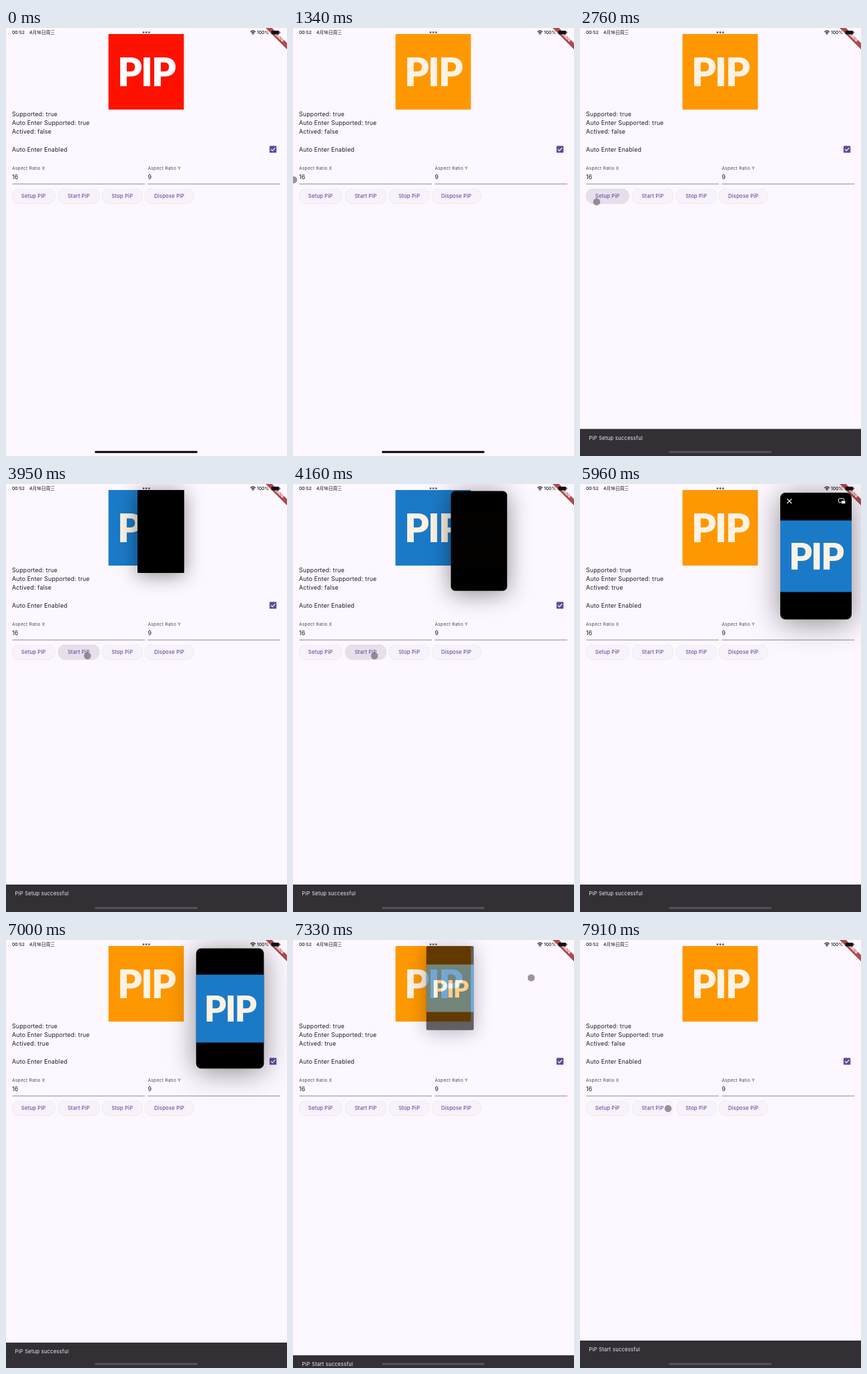
An HTML page for the animation above (8 s loop, 421 px wide and 640 px high).

```html
<!DOCTYPE html>
<html>
<head>
<meta charset="utf-8">
<style>
  html, body { margin: 0; width: 100%; height: 100%; overflow: hidden; background: #fdf8ff; }
  svg { display: block; width: 421px; height: 640px; font-family: Inter, "Noto Sans CJK SC", sans-serif; fill: #1d1b20; }
  .body { font-size: 8.8px; letter-spacing: .2px; }
  .label { font-size: 6.6px; letter-spacing: .28px; fill: #49454f; }
  .button { font-size: 7.7px; letter-spacing: .17px; font-weight: 500; fill: #6750a4; text-anchor: middle; }
  .status { font-size: 6.7px; font-weight: 500; }
  .pill { filter: drop-shadow(0 .7px .6px rgba(60, 40, 80, .3)); }
  .logo { font: 900 58px Lato, sans-serif; letter-spacing: -2px; text-anchor: middle; }
  #pip { filter: drop-shadow(0 5px 22px rgba(0, 0, 0, .45)); }
</style>
</head>
<body>
<svg viewBox="0 0 421 640">
  <rect width="421" height="640" fill="#fdf8ff"/>

  <g transform="translate(153.5 9)">
    <rect id="appColor" width="113" height="113"/>
    <text id="appLogo" class="logo" x="56.5" y="78">PIP</text>
  </g>

  <g class="body">
    <text x="9" y="131.7">Supported: true</text>
    <text x="9" y="144.8">Auto Enter Supported: true</text>
    <text id="active" x="9" y="157.8"></text>
    <text x="9" y="185">Auto Enter Enabled</text>
    <text x="9" y="225.6">16</text>
    <text x="212.5" y="225.6">9</text>
  </g>
  <rect x="394.8" y="176.2" width="10.4" height="10.4" rx="1.2" fill="#5f499f"/>
  <path d="M396.9 181.4l2.2 2.3 4.2-4.5" fill="none" stroke="#fff" stroke-width="1.2"/>
  <text class="label" x="9" y="212">Aspect Ratio X</text>
  <text class="label" x="212.5" y="212">Aspect Ratio Y</text>
  <path d="M9.5 233.2H208M212.5 233.2H411" stroke="#6f6a73" stroke-width=".8"/>
  <g id="buttons"></g>

  <g id="snack">
    <rect y="599" width="421" height="42" fill="#322f35"/>
    <text id="snackText" x="13.5" y="615" font-size="7.6" letter-spacing=".25" fill="#f5eff7"></text>
  </g>

  <path d="M389 0h9.6L421 22.4V32Z" fill="#b04a4e"/>
  <text transform="translate(408.4 12.6) rotate(45)" text-anchor="middle" y="2" font-size="5.6" font-weight="900" fill="#fff">DEBUG</text>

  <g class="status">
    <text x="9" y="9">00:52</text>
    <text x="35" y="9">4月16日周三</text>
    <text x="376" y="9">100%</text>
  </g>
  <g fill="#55525a">
    <circle cx="206" cy="6.6" r="1.4"/><circle cx="210.2" cy="6.6" r="1.4"/><circle cx="214.4" cy="6.6" r="1.4"/>
  </g>
  <g fill="none" stroke="#111" stroke-width="1.2">
    <path d="M366.3 5.7q3.7-3.2 7.4 0M367.7 7.4q2.3-1.9 4.6 0"/>
  </g>
  <circle cx="370" cy="8.8" r="1"/>
  <rect x="397.5" y="4" width="12" height="5.4" rx="1.5" fill="#111"/>
  <rect x="410.1" y="5.7" width=".8" height="2" fill="#111"/>

  <g id="pip">
    <rect id="pipFrame" width="107" height="189.5" fill="#000"/>
    <g id="pipVideo" transform="translate(0 41.5) scale(.947)">
      <rect id="pipColor" width="113" height="113"/>
      <text id="pipLogo" class="logo" x="56.5" y="78">PIP</text>
    </g>
    <g id="controls" fill="none" stroke="#fff">
      <path d="M10.2 9.2l7 7M17.2 9.2l-7 7" stroke-width="1.2"/>
      <rect x="87.5" y="8.7" width="8" height="6" rx="1"/>
      <rect x="91.5" y="12" width="6.2" height="4.6" rx="1" fill="#fff" stroke="#000" stroke-width=".6"/>
    </g>
  </g>

  <rect id="home" x="133" y="632.6" width="154" height="3" rx="1.5"/>
  <circle id="pointer" r="5.3" fill="#6b6470" opacity=".68"/>
</svg>
<script>
const LOOP = 8000;
const RED = '#ff1100', ORANGE = '#ff9800', BLUE = '#1b7ac8';
const $ = id => document.getElementById(id);
const set = (id, attrs) => { for (const k in attrs) $(id).setAttribute(k, attrs[k]); };
const show = (id, on) => set(id, { visibility: on ? 'visible' : 'hidden' });
const ramp = (t, from, to) => {
  const p = Math.min(1, Math.max(0, (t - from) / (to - from)));
  return p * p * (3 - 2 * p);
};
const mix = (a, b, p) => a + (b - a) * p;
const within = (t, from, to) => t >= from && t < to;

const buttons = [
  ['Setup PiP', 9, 64.5, 2400, 2960],
  ['Start PiP', 78, 62, 3620, 4200],
  ['Stop PiP', 144, 60.5],
  ['Dispose PiP', 208, 73.5]
];
$('buttons').innerHTML = buttons.map(([name, x, w], i) =>
  `<rect id="b${i}" class="pill" x="${x}" y="240" width="${w}" height="22.8" rx="11.4"/>
   <text class="button" x="${x + w / 2}" y="254.3">${name}</text>`).join('');

// time, x, y
const route = [
  [1250, -8, 222], [1340, 1, 227], [2050, 25, 260], [2900, 25, 260],
  [3520, 122, 257], [4400, 122, 257], [4810, 235, 119], [5350, 392, 26],
  [7250, 392, 26], [7850, 132, 252]
];
function pointerAt(t) {
  const i = route.findIndex(k => k[0] > t);
  if (i === 0) return [-20, 222];
  if (i < 0) return route[route.length - 1].slice(1);
  const [t0, x0, y0] = route[i - 1], [t1, x1, y1] = route[i];
  const p = (t - t0) / (t1 - t0);
  return [mix(x0, x1, p), mix(y0, y1, p)];
}

function paint(name, color) {
  set(name + 'Color', { fill: color });
  set(name + 'Logo', { fill: color === RED ? '#fff' : '#fdf3e4' });
}

function draw(t) {
  paint('app', t < 800 ? RED : within(t, 3300, 5700) ? BLUE : ORANGE);
  paint('pip', t < 5700 ? ORANGE : BLUE);
  $('active').textContent = 'Actived: ' + within(t, 4450, 7350);
  buttons.forEach(([, , , from, to], i) =>
    set('b' + i, { fill: within(t, from, to) ? '#e7e0eb' : '#f8f2fb' }));

  const lift = t < 7210
    ? ramp(t, 2490, 2780) - ramp(t, 6960, 7210)
    : ramp(t, 7210, 7460);
  set('snack', { transform: `translate(0 ${42 * (1 - lift)})` });
  $('snackText').textContent = t < 7210 ? 'PiP Setup successful' : 'PiP Start successful';
  set('home', { fill: lift > .3 ? '#57545b' : '#000' });

  // The floating window grows out of the app view and returns to it.
  const open = ramp(t, 3950, 4450) - ramp(t, 6880, 7380);
  const scale = mix(70, 107, open) / 107;
  show('pip', within(t, 3850, 7400));
  set('pip', {
    transform: `translate(${mix(197, 300, open)} ${mix(9, 13, open)}) scale(${scale})`,
    opacity: ramp(t, 3850, 3940) - ramp(t, 7280, 7400)
  });
  set('pipFrame', { rx: mix(2, 8, Math.min(1, open * 4)) });
  set('pipVideo', { opacity: ramp(t, 4150, 4350) });
  set('controls', { opacity: ramp(t, 4450, 4600) - ramp(t, 6800, 6900) });

  const [x, y] = pointerAt(t);
  set('pointer', { cx: x, cy: y });
  show('pointer', t >= 1250 && !within(t, 5350, 7250));
}

(function frame() {
  draw(performance.now() % LOOP);
  requestAnimationFrame(frame);
})();
</script>
</body>
</html>
```
